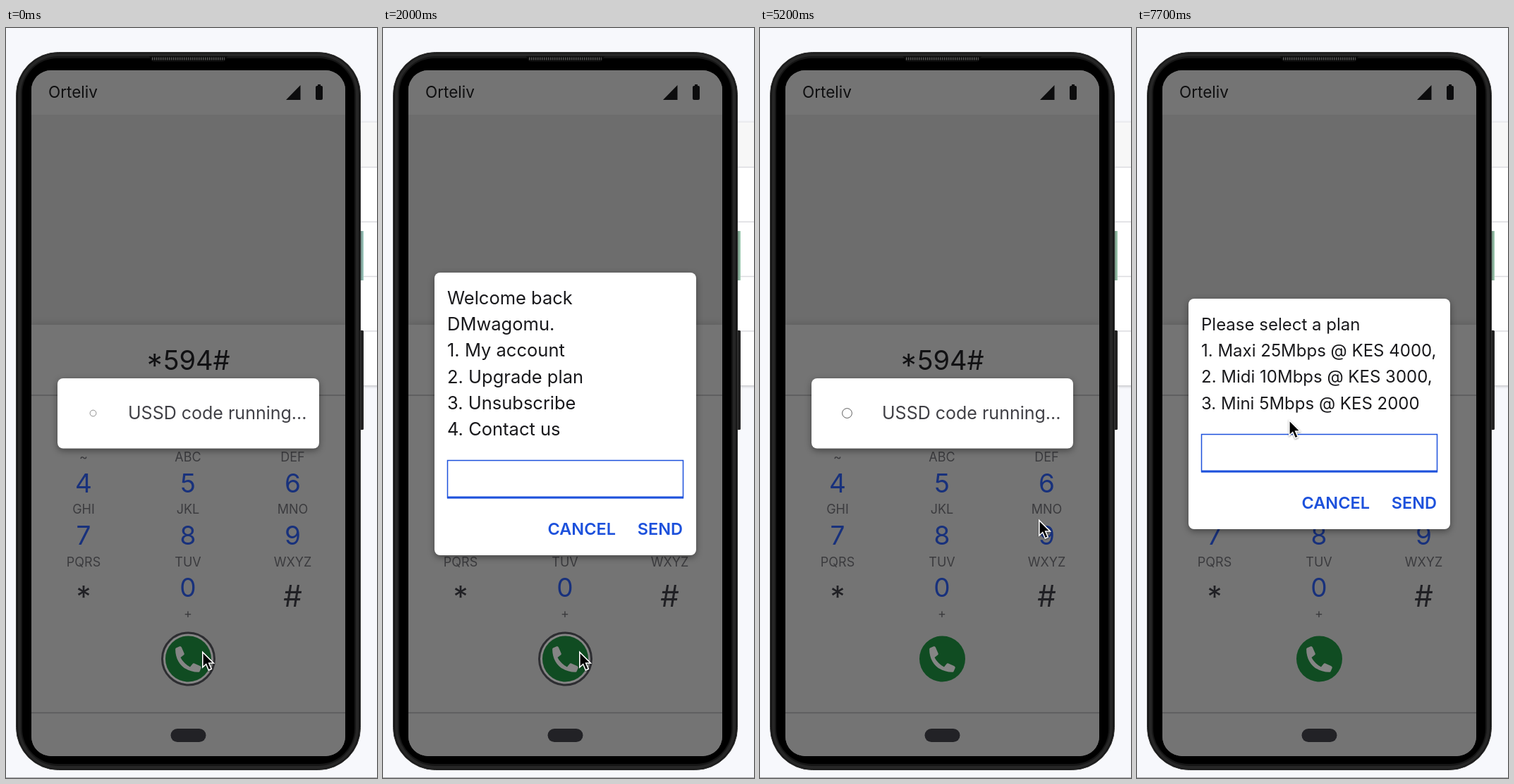
Recreate the animation shown at these times as an HTML page. Size 526x1064 px, loop 8000 ms.

```html
<!DOCTYPE html>
<html lang="en">
<head>
<meta charset="utf-8">
<title>USSD session</title>
<style>
  html, body { margin: 0; height: 100%; overflow: hidden; background: #f7f8fc; }
  svg { display: block; width: 100vw; height: 100vh; font-family: Inter, sans-serif; }
  .dialog { filter: drop-shadow(0 3px 5px #0006); }
  .digit { font-size: 37px; fill: #18317c; text-anchor: middle; }
  .sign { font-size: 42px; fill: #202024; text-anchor: middle; }
  .letters { font-size: 18px; fill: #3b3b3e; text-anchor: middle; }
  .action { font-size: 23.5px; font-weight: 600; fill: #1d51dc; text-anchor: end; }
</style>
</head>
<body>
<svg viewBox="0 0 526 1064">
  <defs>
    <linearGradient id="edge"><stop offset="0" stop-color="#0005"/><stop offset="1" stop-color="#0000"/></linearGradient>
    <clipPath id="screen"><rect x="36" y="60" width="445" height="973" rx="28"/></clipPath>
  </defs>

  <!-- neighbouring card -->
  <rect x="440" y="134" width="120" height="373" fill="#fff" style="filter:drop-shadow(0 1px 2px #0004)"/>
  <path d="M440 134h90v63h-90z" fill="#f7f7f7"/>
  <path d="M440 197.5h90M440 275h90M440 352.5h90M440 430h90" stroke="#dcdcdf" stroke-width="1.3"/>
  <rect id="bar" x="480" y="288" width="27" height="70"/>
  <rect x="503" y="288" width="4" height="70" fill="url(#edge)"/>
  <rect x="480" y="429" width="27" height="141" rx="1.5" fill="#222"/>
  <path d="M0 1063.5h526" stroke="#a9a9ad"/>

  <!-- phone -->
  <rect x="14.5" y="34.5" width="488" height="1018" rx="60" fill="#161616" stroke="#333"/>
  <rect x="19" y="38" width="479" height="1011" rx="56" fill="none" stroke="#262626" stroke-width="4"/>
  <rect x="23" y="43" width="471" height="1001" rx="50" fill="#000"/>
  <path d="M203 40h111l-3 6q-1 2-4 2h-97q-3 0-4-2z" fill="#0b0b0b"/>
  <path d="M207 43.5h103" stroke="#555" stroke-width="4" stroke-dasharray="1.5 1.5"/>

  <g clip-path="url(#screen)">
    <path d="M36 60h445v973H36z" fill="#6d6d6d"/>
    <path d="M36 60h445v63H36z" fill="#747474"/>
    <rect x="36" y="421" width="445" height="620" fill="#747474" style="filter:drop-shadow(0 -2px 4px #0002)"/>
    <path d="M36 521h445M36 971.5h445" stroke="#58585a" stroke-width="1.5"/>
    <text x="60" y="99" font-size="22.5" fill="#0f0f10">Orteliv</text>
    <path d="M397 102h20.5V81zM439 84q0-2 2-2h1v-2h4v2h1q2 0 2 2v16q0 2-2 2h-6q-2 0-2-2z" fill="#0c0c0d"/>
    <text x="258" y="485" font-size="38" fill="#111113" text-anchor="middle">*594#</text>
    <g id="keys"></g>
    <g id="ring" fill="none">
      <circle cx="258.5" cy="895" r="34" stroke="#858585" stroke-width="3"/>
      <circle cx="258.5" cy="895" r="37" stroke="#2d2d31" stroke-width="3"/>
    </g>
    <circle cx="258.5" cy="895" r="32.5" fill="#104c22"/>
    <path transform="translate(234 871) scale(2.04)" fill="#858585" d="M6.62 10.79c1.44 2.83 3.76 5.14 6.59 6.59l1.7-2.1c.35-.4.8-.5 1.3-.3l3.9 1.7c.6.25.95.8.8 1.4L20 20.200c-.15.5-.55.8-1.1.8C9.6 21 3 14.400 3 5.100c0-.55.3-.95.8-1.1L6 3.100c.6-.15 1.100.2 1.400.8l1.700 3.900c.2.5.1.95-.3 1.300z"/>
    <rect x="233.5" y="994" width="50" height="19" rx="9.5" fill="#222226"/>
  </g>

  <g id="running">
    <rect class="dialog" x="73" y="497" width="371" height="99.5" rx="8" fill="#fff"/>
    <g fill="none" stroke="#000" stroke-width="3">
      <circle class="puff" r="28.5"/><circle class="puff" r="28.5"/>
    </g>
    <text x="173" y="555" font-size="25" fill="#404046">USSD code running...</text>
  </g>
  <g id="menu"></g>
  <g id="plans"></g>

  <g id="typed">
    <text id="answer" x="111" y="647" font-size="25" fill="#52525b">2</text>
    <path id="caret" d="M0 622v34" stroke="#333" stroke-width="1.3"/>
  </g>

  <path id="arrow" d="M.8 1.5v21.5l4.9-4.500 3.600 8.500 4-1.700-3.600-8.300h6.600z" stroke="#fff" stroke-width="1.6"
        style="filter:drop-shadow(0 1px 1px #0006)"/>
  <g id="beam" fill="none" stroke-linecap="round">
    <path id="beamShape" d="M-5-10q5 0 5 3v14q0 3-5 3M5-10q-5 0-5 3v14q0 3 5 3M-3 4h6"/>
  </g>
</svg>
<script>
const $ = id => document.getElementById(id);
const LOOP = 8000, STEP = 100;
const MENU_AT = 1900, FOCUS_AT = 3000, TYPE_AT = 3700, SEND_AT = 5100, PLANS_AT = 7700;
const FIRST_CALL = -60, PUFF = 1800;

// cursor waypoints: time, x, y
const PATH = [
  [0, 278, 884], [2300, 278, 884], [3000, 172, 640], [3200, 165, 640], [3400, 155, 637],
  [4000, 155, 637], [4400, 255, 657], [4900, 395, 697], [6700, 395, 697],
  [7200, 285, 592], [7700, 215, 555], [8000, 215, 555]
];

function buildKeys() {
  const text = (cls, x, y, s) => `<text class="${cls}" x="${x}" y="${y}">${s}</text>`;
  const columns = [110, 258, 406.5];
  const letters = ["~ ABC DEF", "GHI JKL MNO", "PQRS TUV WXYZ"];
  let out = "";
  letters.forEach((row, r) => row.split(" ").forEach((s, c) => {
    const y = 615 + r * 74.3;
    out += text("letters", columns[c], y, s);
    if (r < 2) out += text("digit", columns[c], y + 43.5, 4 + r * 3 + c);
  }));
  out += text("digit", 258, 807, 0) + text("letters", 258, 837, "+");
  $("keys").innerHTML = out + text("sign", 110, 822, "*") + text("sign", 406.5, 821, "#");
}

function buildDialog(id, top, bottom, size, lines) {
  const rows = lines.map((s, i) =>
    `<text x="91" y="${top + 45 + i * 37.2}" font-size="${size}" fill="#19191c">${s}</text>`).join("");
  const y = bottom - 134.5;
  $(id).innerHTML = `
    <rect class="dialog" x="73" y="${top}" width="371" height="${bottom - top}" rx="8" fill="#fff"/>${rows}
    <rect class="field" x="91.5" y="${y}" width="334" height="53" fill="none" stroke="#1d51dc" stroke-width="1.5"/>
    <path d="M91 ${y + 52.5}h335" stroke="#1d51dc" stroke-width="3"/>
    <text class="action" x="330" y="${bottom - 29}">CANCEL</text>
    <text class="action" x="425" y="${bottom - 29}">SEND</text>`;
}

function buildBeam() {
  const shape = $("beamShape"), core = shape.cloneNode();
  core.removeAttribute("id");
  [[shape, "#fff", 4], [core, "#000", 1.8]].forEach(([path, colour, width]) => {
    path.setAttribute("stroke", colour);
    path.setAttribute("stroke-width", width);
  });
  $("beam").append(core);
}

function bezier(x1, y1, x2, y2) {
  const at = (a, b, s) => 3 * (1 - s) ** 2 * s * a + 3 * (1 - s) * s * s * b + s ** 3;
  return x => {
    let lo = 0, hi = 1;
    for (let i = 0; i < 20; i++) {
      const mid = (lo + hi) / 2;
      if (at(x1, x2, mid) < x) lo = mid; else hi = mid;
    }
    return at(y1, y2, lo);
  };
}
const grow = bezier(0.165, 0.84, 0.44, 1);
const fade = bezier(0.3, 0.61, 0.355, 1);

function cursorAt(t) {
  const i = PATH.findIndex(p => p[0] > t);
  const [t0, x0, y0] = PATH[i - 1], [t1, x1, y1] = PATH[i];
  const k = (t - t0) / (t1 - t0);
  return [x0 + (x1 - x0) * k, y0 + (y1 - y0) * k];
}

const show = (id, on) => $(id).style.display = on ? "" : "none";
const puffs = document.querySelectorAll(".puff");

function draw(t) {
  const menu = t >= MENU_AT && t < SEND_AT, plans = t >= PLANS_AT;
  const focused = menu && t >= FOCUS_AT, answered = t >= TYPE_AT;
  show("menu", menu);
  show("plans", plans);
  show("running", !menu && !plans);
  show("ring", t < FOCUS_AT);
  show("typed", focused);
  show("answer", answered);
  $("caret").setAttribute("transform", `translate(${answered ? 126.5 : 112.5})`);
  $("menu").querySelector(".field").setAttribute("stroke-width", focused ? 3 : 1.5);
  $("bar").setAttribute("fill", `hsl(${165 - 20 * Math.min(t / 2200, 1)} 34% 74%)`);

  puffs.forEach((puff, i) => {
    const age = t - (t < SEND_AT ? FIRST_CALL : SEND_AT) - i * PUFF / 2;
    const p = Math.max(age, 0) % PUFF / PUFF;
    puff.setAttribute("transform", `translate(123.5 546.5) scale(${grow(p)})`);
    puff.setAttribute("opacity", age > 0 ? 1 - fade(p) : 0);
  });

  const [x, y] = cursorAt(t);
  const typing = menu && x > 91 && x < 426 && y > 613 && y < 668;
  show("beam", typing);
  show("arrow", !typing);
  $(typing ? "beam" : "arrow").setAttribute("transform", `translate(${x} ${y})`);
}

buildKeys();
buildBeam();
buildDialog("menu", 347, 748, 25.5, ["Welcome back", "DMwagomu.", "1. My account",
  "2. Upgrade plan", "3. Unsubscribe", "4. Contact us"]);
buildDialog("plans", 384, 711, 24, ["Please select a plan", "1. Maxi 25Mbps @ KES 4000,",
  "2. Midi 10Mbps @ KES 3000,", "3. Mini 5Mbps @ KES 2000"]);

const start = performance.now();
function tick() {
  const t = (performance.now() - start) % LOOP;
  draw(Math.floor(t / STEP) * STEP);
  requestAnimationFrame(tick);
}
tick();
</script>
</body>
</html>
```
